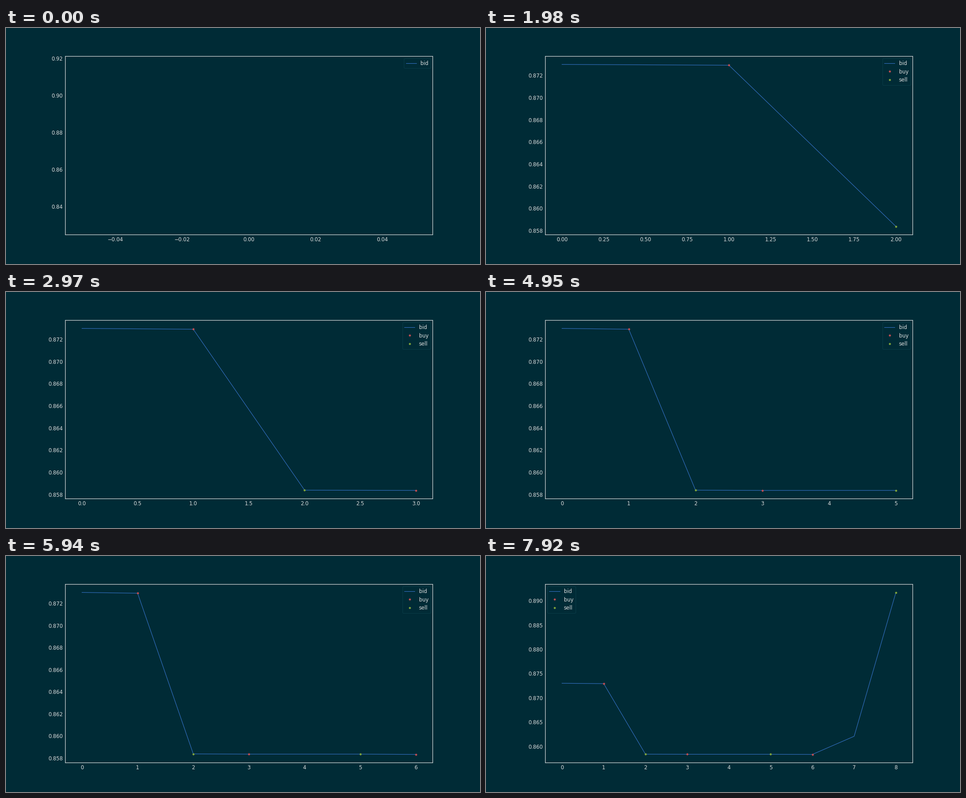
Animation of 1058 by 529 pixels, one loop 8 s. Source, as a matplotlib script:

```python
import matplotlib.pyplot as plt
from matplotlib.animation import FuncAnimation

BACK, TEXT, FRAME = "#002b36", "#dcdcdc", "#0a3b47"
BLUE, RED, GREEN = "#3572c6", "#c44e52", "#83a83b"
INTERVAL, LOOP, STEP = 40, 8000, 990  # ms
WIDTH, HEIGHT, DPI = 1058, 529, 80

BIDS = [0.8729928, 0.87292, 0.858377, 0.858357, 0.858357,
        0.858357, 0.858332, 0.86207, 0.89172]
BUYS, SELLS = [1, 3, 6], [2, 5, 8]

plt.rcParams.update({
    "font.family": "DejaVu Sans",
    "font.size": 10.4,
    "legend.fontsize": 10.4,
    "legend.borderaxespad": 0.4,
    "text.color": TEXT,
    "xtick.color": TEXT,
    "ytick.color": TEXT,
    "xtick.major.size": 0,
    "ytick.major.size": 0,
    "xtick.major.pad": 5,
    "ytick.major.pad": 5,
    "axes.edgecolor": TEXT,
    "axes.facecolor": BACK,
    "axes.linewidth": 1.1,
    "axes.formatter.limits": [-7, 7],
})

fig = plt.figure(figsize=(WIDTH / DPI, HEIGHT / DPI), dpi=DPI, facecolor=BACK)
ax = fig.add_axes([0.125, 0.125, 0.775, 0.755])


def plot_trades(days, last, color, label):
    done = [d for d in days if d <= last]
    if done:
        ax.plot(done, [BIDS[d] for d in done], ".", color=color, label=label)


def draw_chart(last):
    ax.clear()
    ax.plot(range(last + 1), BIDS[:last + 1], color=BLUE, lw=1, label="bid")
    plot_trades(BUYS, last, RED, "buy")
    plot_trades(SELLS, last, GREEN, "sell")
    corner = "upper left" if BIDS[last] > BIDS[0] else "upper right"
    ax.legend(loc=corner, facecolor=BACK, edgecolor=FRAME, framealpha=1)


def update(i):
    last = (i * INTERVAL + INTERVAL - 1) // STEP
    # Redraw only when a new bid has arrived
    if not ax.lines or len(ax.lines[0].get_xdata()) != last + 1:
        draw_chart(last)
    return ax.lines


anim = FuncAnimation(fig, update, frames=LOOP // INTERVAL, interval=INTERVAL,
                     init_func=lambda: update(0), repeat=True, repeat_delay=0,
                     blit=False)
plt.show()
```
